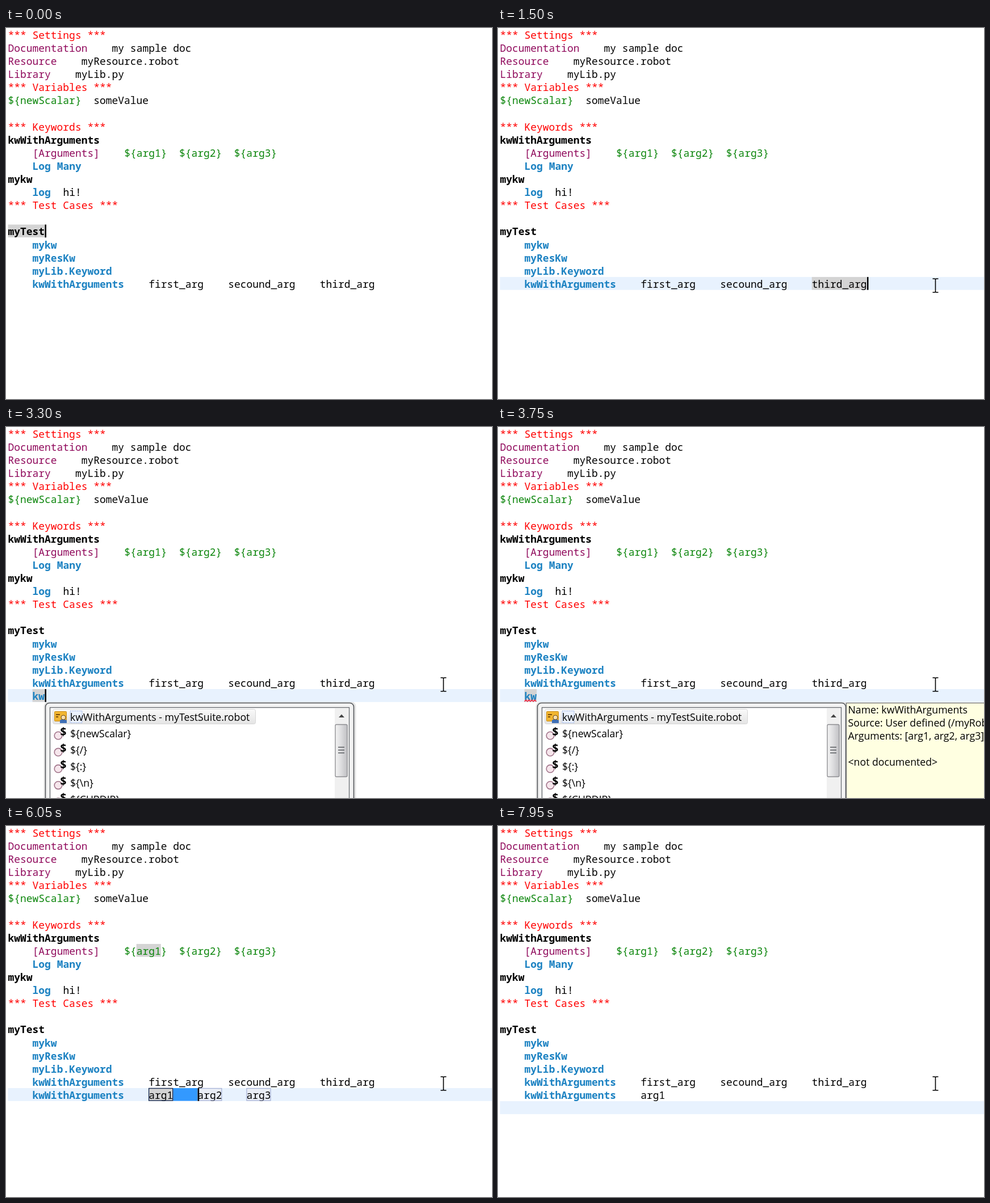
Write an HTML page that moves like this. It is 856 by 654 pixels and loops after 8 s.

```html
<!DOCTYPE html>
<html lang="en">
<head>
<meta charset="utf-8">
<title>Keyword completion</title>
<style>
  html, body { margin: 0; width: 100%; height: 100%; overflow: hidden; background: #fff; }
  svg { display: block; width: 856px; height: 654px; }
  text { white-space: pre; }
  .code text { font: 17.95px "Noto Sans Mono", "DejaVu Sans Mono", monospace; fill: #000; }
  .code .head { fill: #f00; }
  .code .set { fill: #900a5c; }
  .code .var { fill: #0c860c; }
  .code .name { font-weight: 700; }
  .code .kw { font-weight: 700; fill: #1c82c2; }
  .code .white { fill: #fff; }
  .ui text { font: 17.7px "Open Sans", "Noto Sans", sans-serif; fill: #000; }
  .ui .dollar { font-weight: 700; font-size: 19px; }
</style>
</head>
<body>
<svg id="stage" viewBox="0 0 856 654">
  <defs>
    <linearGradient id="pick" x2="0" y2="1">
      <stop stop-color="#fafafa"/><stop offset="1" stop-color="#e4e4e4"/>
    </linearGradient>
    <linearGradient id="thumb">
      <stop stop-color="#f4f4f4"/><stop offset=".5" stop-color="#dcdcde"/><stop offset="1" stop-color="#c0c0c4"/>
    </linearGradient>
  </defs>
  <g id="back"></g>
  <g id="text" class="code"></g>
  <g id="front" class="code"></g>
  <g id="popup" class="ui"></g>
  <g id="doc" class="ui"></g>
  <path id="mouse" d="M-5-12h3.5q1.5 0 1.5 2q0-2 1.5-2h3.5M0-10.5v21M-5 12h3.5q1.5 0 1.5-2q0 2 1.5 2h3.5"
        fill="none" stroke="#000" stroke-width="1.6"/>
</svg>
<script>
const LOOP = 8000, CHAR = 10.77, ROW = 23.1, BASE = 18.9;
const colX = c => 3.5 + c * CHAR;
const rowY = r => r * ROW;
const $ = id => document.getElementById(id);

const esc = s => s.replace(/&/g, '&amp;').replace(/</g, '&lt;');
const label = (x, y, s, cls = '') => `<text x="${x}" y="${y}" class="${cls}">${esc(s)}</text>`;
const rect = (x, y, w, h, fill, more = '') =>
  `<rect x="${x}" y="${y}" width="${w}" height="${h}" fill="${fill}" ${more}/>`;
const token = (row, col, s, cls) => label(colX(col), rowY(row) + BASE, s, cls);
const cells = (row, col, len, fill) => rect(colX(col), rowY(row), len * CHAR, 22.6, fill);

// Editor text: row, then column, string, class triples
const code = [
  [0, 0, '*** Settings ***', 'head'],
  [1, 0, 'Documentation', 'set', 17, 'my sample doc', ''],
  [2, 0, 'Resource', 'set', 12, 'myResource.robot', ''],
  [3, 0, 'Library', 'set', 11, 'myLib.py', ''],
  [4, 0, '*** Variables ***', 'head'],
  [5, 0, '${newScalar}', 'var', 14, 'someValue', ''],
  [7, 0, '*** Keywords ***', 'head'],
  [8, 0, 'kwWithArguments', 'name'],
  [9, 4, '[Arguments]', 'set', 19, '${arg1}  ${arg2}  ${arg3}', 'var'],
  [10, 4, 'Log Many', 'kw'],
  [11, 0, 'mykw', 'name'],
  [12, 4, 'log', 'kw', 9, 'hi!', ''],
  [13, 0, '*** Test Cases ***', 'head'],
  [15, 0, 'myTest', 'name'],
  [16, 4, 'mykw', 'kw'],
  [17, 4, 'myResKw', 'kw'],
  [18, 4, 'myLib.Keyword', 'kw'],
  [19, 4, 'kwWithArguments', 'kw', 23, 'first_arg', '', 36, 'secound_arg', '', 51, 'third_arg', '']
];
$('text').innerHTML = code.map(([row, ...rest]) => {
  let out = '';
  for (let i = 0; i < rest.length; i += 3) out += token(row, rest[i], rest[i + 1], rest[i + 2]);
  return out;
}).join('');

// Completion list
const items = ['${newScalar}', '${/}', '${:}', '${\\n}', '${CURDIR}'];
$('popup').innerHTML =
  rect(66.5, 484.5, 550, 180, '#000', 'rx="8" opacity=".1"') +
  rect(69.5, 486.5, 543, 180, '#f3f3f3', 'rx="7" stroke="#55585c" stroke-width="1.6"') +
  rect(77.5, 494.5, 527, 170, '#fff', 'stroke="#6a6d72" stroke-width="1.4"') +
  rect(82.5, 497.5, 357, 26, 'url(#pick)', 'rx="3" stroke="#d6d6d6"') +
  rect(113, 500.5, 21, 21, '#eaf1fd', 'stroke="#7c9be0" stroke-dasharray="1.5 1.5"') +
  rect(85.5, 501.5, 21, 17, '#f2b632', 'rx="1" stroke="#c98a12"') +
  '<path d="M88 507h7M88 511h4" stroke="#7a4c08" stroke-width="2"/>' +
  '<path d="M95 522v-5q5-4 12 0v5z" fill="#3f6fb5"/><circle cx="101" cy="512" r="4" fill="#f7dfb0" stroke="#6b4a1a"/>' +
  label(113, 517.5, 'kwWithArguments - myTestSuite.robot') +
  items.map((s, i) => {
    const y = 540.5 + i * 29.2;
    return `<circle cx="92" cy="${y + 3.5}" r="6.8" fill="#f6e6ec" stroke="#a1748a" stroke-width="1.6"/>` +
      label(95.5, y + 3, '$', 'dollar') + label(113, y + 6, s);
  }).join('') +
  rect(579, 496, 24, 160, '#f0f0f0') +
  '<path d="M586 512l5-5.5 5 5.5z" fill="#444"/>' +
  rect(580, 524.5, 21, 92, 'url(#thumb)', 'rx="2" stroke="#8c8c90" stroke-width="1.3"') +
  '<path d="M585 564.5h11M585 569.5h11M585 574.5h11" stroke="#55585c" stroke-width="1.6"/>';

// Documentation panel
const facts = ['Name: kwWithArguments', 'Source: User defined (/myRobot',
  'Arguments: [arg1, arg2, arg3]', '', '<not documented>'];
$('doc').innerHTML =
  rect(613.5, 486.5, 260, 180, '#ffffe1', 'stroke="#77787a" stroke-width="1.4"') +
  facts.map((s, i) => label(616.5, 504.7 + i * ROW, s)).join('');

const typed = s => [[4, s, 'kw']];
const oneArg = [[4, 'kwWithArguments', 'kw'], [23, 'arg1', '']];
const allArgs = [...oneArg, [31, 'arg2', ''], [39, 'arg3', '']];

// Each step changes part of the state from its time on
const steps = [
  [0, { gray: [[15, 0, 6]], caret: [15, 6], line: [], boxes: [] }],
  [650, { caret: null, mouse: [540.5, 380.5] }],
  [800, { mouse: [588, 399] }],
  [900, { mouse: [676, 438] }],
  [1000, { mouse: [744, 466] }],
  [1100, { mouse: [768, 461] }],
  [1200, { mouse: [770.5, 454], caret: [15, 6] }],
  [1400, { hl: 19, caret: [19, 60] }],
  [1500, { gray: [[19, 51, 9]] }],
  [1700, { hl: 20, caret: [20, 4] }],
  [1800, { gray: [] }],
  [2200, { caret: null }],
  [2500, { line: typed('k'), caret: [20, 5] }],
  [2600, { gray: [[20, 4, 1]] }],
  [2950, { line: typed('kw'), caret: [20, 6], gray: [[20, 4, 2]] }],
  [3300, { popup: true }],
  [3500, { caret: null }],
  [3650, { doc: true }],
  [3750, { wave: 2 }],
  [3950, { popup: false, doc: false, line: allArgs, boxes: [23, 31, 39], sel: [23, 27],
           wave: 39, gray: [], caret: [20, 27] }],
  [4050, { gray: [[9, 21, 4]] }],
  [4450, { wave: 0 }],
  [4550, { caret: null }],
  [5050, { caret: [20, 27] }],
  [5550, { caret: null }],
  [5750, { sel: null, gray: [[9, 21, 4], [20, 23, 4]] }],
  [6050, { sel: [27, 31], caret: [20, 31] }],
  [6150, { gray: [[9, 30, 4], [20, 31, 4]] }],
  [6500, { sel: [27, 35], caret: [20, 35] }],
  [6600, { sel: [27, 39], caret: [20, 39] }],
  [6700, { sel: [27, 43], caret: [20, 43], gray: [[9, 39, 4]] }],
  [7300, { sel: null, caret: [20, 27], line: oneArg, boxes: [23], gray: [[9, 21, 4], [20, 23, 4]] }],
  [7500, { hl: 21, caret: [21, 4], boxes: [] }],
  [7600, { gray: [] }],
  [7950, { caret: null }]
];
let state = {};
const states = steps.map(([, change]) => state = { ...state, ...change });

function wavePath(len) {
  let d = `M${colX(4)} 484`;
  for (let i = 1; i * 2.6 <= len * CHAR; i++) d += `L${colX(4) + i * 2.6} ${i % 2 ? 481 : 484}`;
  return `<path d="${d}" fill="none" stroke="#f0203c" stroke-width="1.3"/>`;
}

function draw(s) {
  const sel = s.sel || [0, 0];
  const picked = col => col >= sel[0] && col < sel[1];
  let back = s.hl ? rect(3.5, rowY(s.hl), 853, 22.8, '#e8f2fe') : '';
  back += s.boxes.map(c => cells(20, c, 4, '#e9edf5')).join('');
  back += s.gray.map(g => cells(...g, '#d4d4d4')).join('');
  if (s.sel) back += cells(20, sel[0], sel[1] - sel[0], '#3399ff');
  $('back').innerHTML = back;

  let front = s.line.map(([c, str, cls]) => token(20, c, str, picked(c) ? 'white' : cls)).join('');
  front += s.boxes.map(c => rect(colX(c) + .4, 462.5, 4 * CHAR - 1, 21.5, 'none',
    c === 23 ? 'stroke="#1d2f55" stroke-width="1.4"' : 'stroke="#a3b0d6" stroke-width="1.2"')).join('');
  if (s.wave) front += wavePath(s.wave);
  if (s.caret) front += rect(colX(s.caret[1]) + .3, rowY(s.caret[0]), 2.5, 22.8, '#000');
  $('front').innerHTML = front;

  $('popup').style.display = s.popup ? '' : 'none';
  $('doc').style.display = s.doc ? '' : 'none';
  $('mouse').style.display = s.mouse ? '' : 'none';
  if (s.mouse) $('mouse').setAttribute('transform', `translate(${s.mouse})`);
}

let shown = -1;
const start = performance.now();
function tick() {
  const t = (performance.now() - start) % LOOP;
  const now = steps.findLastIndex(([at]) => at <= t);
  if (now !== shown) draw(states[shown = now]);
  requestAnimationFrame(tick);
}
tick();
</script>
</body>
</html>
```
